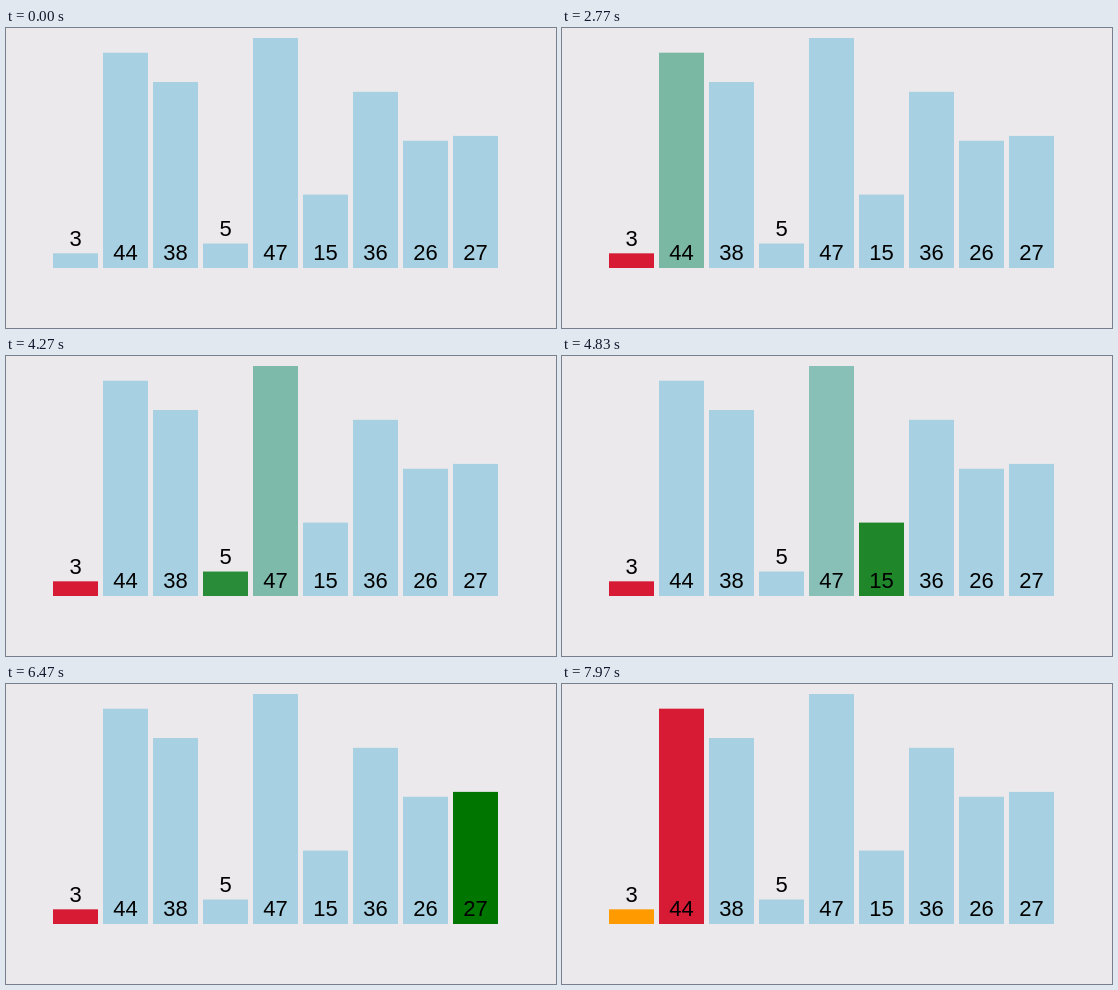
These frames come from a looping animation (550x300 px, 8 s). An HTML page:

```html
<!DOCTYPE html>
<html lang="en">
<head>
<meta charset="utf-8">
<title>Selection sort</title>
<style>
  html, body { margin: 0; width: 100%; height: 100%; overflow: hidden; background: #ebe9eb; }
  svg { display: block; width: 100%; height: 100%; }
  text { font: 22px "Liberation Sans", Arial, sans-serif; text-anchor: middle; }
</style>
</head>
<body>
<svg viewBox="0 0 550 300"></svg>
<script>
const LOOP = 8000, STEP = 501, FADE = 240, FIRST_STEP = 2172;
const BASE = 240, UNIT = 230 / 47;
const IDLE = [167, 209, 226], CHECK = [0, 117, 0], MINIMUM = [216, 27, 52], SORTED = [255, 155, 0];
const values = [3, 44, 38, 5, 47, 15, 36, 26, 27];
const svg = document.querySelector('svg');

function add(tag, attributes) {
  const node = document.createElementNS('http://www.w3.org/2000/svg', tag);
  for (const name in attributes) node.setAttribute(name, attributes[name]);
  return svg.appendChild(node);
}

const bars = values.map((value, i) => {
  const x = 47 + 50 * i, height = value * UNIT, top = BASE - height;
  const bar = add('rect', { x, y: top, width: 45, height });
  const baseline = height < 30 ? top - 7.5 : BASE - 8;
  add('text', { x: x + 22.5, y: baseline }).textContent = value;
  return bar;
});

// Step 0 idle, 1 marks the minimum, 2-9 compare, 10 keeps it, 11 sorts it, 12 starts the next pass.
function barColor(i, step) {
  if (i === 0) return step < 1 ? IDLE : step < 11 ? MINIMUM : SORTED;
  if (i === 1 && step === 12) return MINIMUM;
  return step === i + 1 ? CHECK : IDLE;
}

const ease = t => t < 0.5 ? 4 * t ** 3 : 1 - 4 * (1 - t) ** 3;

function draw(time) {
  const elapsed = time - FIRST_STEP;
  const step = Math.max(0, Math.floor(elapsed / STEP) + 1);
  const sinceStep = elapsed - (step - 1) * STEP;
  const mix = step ? ease(Math.min(1, sinceStep / FADE)) : 1;
  bars.forEach((bar, i) => {
    const from = barColor(i, step - 1), to = barColor(i, step);
    const rgb = from.map((c, k) => Math.round(c + (to[k] - c) * mix));
    bar.setAttribute('fill', `rgb(${rgb})`);
  });
}

const start = performance.now();
function frame() {
  draw((performance.now() - start) % LOOP);
  requestAnimationFrame(frame);
}
frame();
</script>
</body>
</html>
```
